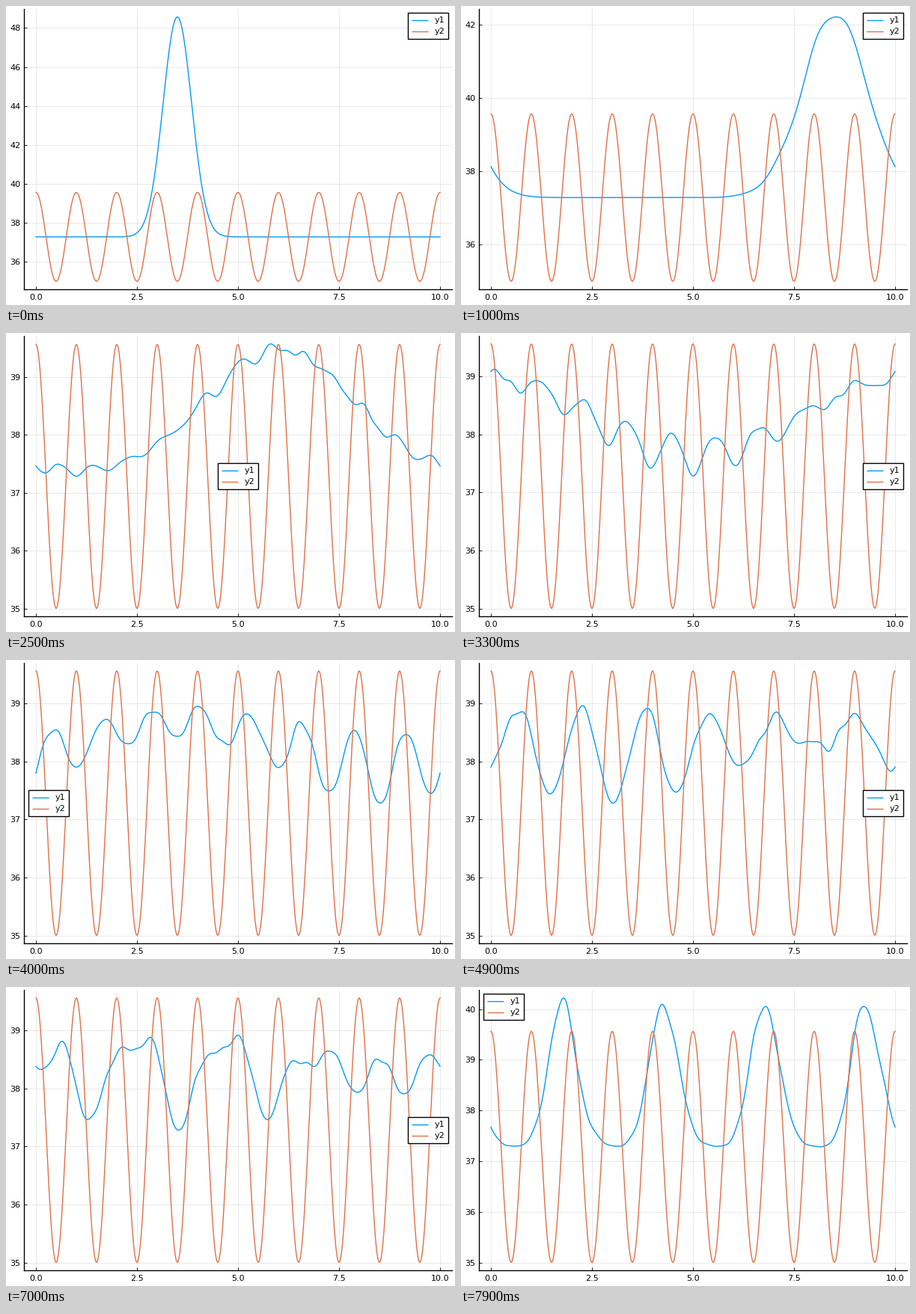
A matplotlib script that plays this animation: 600x400 px, repeating every 8 s.

```python
import numpy as np
import matplotlib.pyplot as plt
from matplotlib.animation import FuncAnimation
from matplotlib.patches import Rectangle

plt.rcParams["font.family"] = "DejaVu Sans"
plt.rcParams["font.size"] = 8

W, H = 600, 400
LEFT, RIGHT, TOP, BOTTOM = 23.8, 596.2, 4, 379
FRAMES, INTERVAL = 80, 100
BLUE, ORANGE = "#009afa", "#e26f46"

# Wave packet on a ring with a cosine lattice
L, N = 10, 500
K0, X0 = 9.74, 3.5
DT, SUB = 0.052, 8
CELL = 0.0262  # spacing of the finite-difference Laplacian
DEPTH = 1.65
BASE, SWING = 37.283, 2.281

x = np.arange(N) * L / N
xs = np.append(x, L)
wave = np.cos(2 * np.pi * xs)
lattice = BASE + SWING * wave


def evolve():
    """Split-step Fourier solution, one density row per frame."""
    h = DT / SUB
    k = 2 * np.pi * np.fft.fftfreq(N, L / N)
    kinetic = (1 - np.cos(k * CELL)) / CELL**2
    half = np.exp(-0.5j * h * DEPTH * wave[:-1])
    drift = np.exp(-1j * h * kinetic)
    psi = np.exp(-2 * (x - X0) ** 2 + 1j * K0 * x)
    psi /= np.sqrt(np.mean(abs(psi) ** 2))
    rows = []
    for _ in range(FRAMES):
        rho = abs(psi) ** 2
        rows.append(BASE + np.append(rho, rho[0]))
        for _ in range(SUB):
            psi = half * np.fft.ifft(drift * np.fft.fft(half * psi))
    return rows


density = evolve()

fig = plt.figure(figsize=(W / 100, H / 100), dpi=100, facecolor="white")
ax = fig.add_axes([LEFT / W, 1 - BOTTOM / H, (RIGHT - LEFT) / W, (BOTTOM - TOP) / H])
ax.set_xlim(-0.3, 10.3)
ax.set_xticks([0, 2.5, 5, 7.5, 10], ["0.0", "2.5", "5.0", "7.5", "10.0"])
ax.spines[["top", "right"]].set_visible(False)
ax.spines[["left", "bottom"]].set_linewidth(1)
ax.tick_params(direction="in", length=3, width=0.6)
ax.tick_params(axis="x", pad=4.5)
ax.tick_params(axis="y", pad=3.2)
ax.set_axisbelow(True)
ax.grid(color="black", alpha=0.1, linewidth=0.6)
(line1,) = ax.plot(xs, density[0], color=BLUE, lw=1)
(line2,) = ax.plot(xs, lattice, color=ORANGE, lw=1)

# Legend, laid out in pixels
BOX_W, BOX_H = 54, 35
SPOTS = [(537, 9), (30, 9), (537, 174), (30, 174), (283, 174)]
over = fig.add_axes([0, 0, 1, 1])
over.set(xlim=(0, W), ylim=(H, 0))
over.axis("off")
box = over.add_patch(Rectangle((0, 0), BOX_W, BOX_H, fc="white", ec="black", lw=1))
keys = []
for name, color, row in (("y1", BLUE, 9.5), ("y2", ORANGE, 24.5)):
    (dash,) = over.plot([], [], color=color, lw=1, solid_capstyle="butt")
    keys.append((dash, over.text(0, 0, name), row))


def best_spot(curves, lo, hi):
    """First spot that covers the fewest curve points."""
    px = LEFT + (xs + 0.3) / 10.6 * (RIGHT - LEFT)

    def hits(spot):
        u, v = spot
        total = 0
        for y in curves:
            py = BOTTOM - (y - lo) / (hi - lo) * (BOTTOM - TOP)
            inside = (px > u) & (px < u + BOX_W) & (py > v) & (py < v + BOX_H)
            total += inside.sum()
        return total

    return min(SPOTS, key=hits)


def draw(i):
    y = density[i]
    lo, hi = min(y.min(), lattice.min()), max(y.max(), lattice.max())
    pad = 0.03 * (hi - lo)
    step = 1 if hi - lo < 6.3 else 2
    lo, hi = lo - pad, hi + pad
    line1.set_ydata(y)
    ax.set_ylim(lo, hi)
    ax.set_yticks(np.arange(np.ceil(lo / step) * step, hi, step))
    u, v = best_spot((y, lattice), lo, hi)
    box.set_xy((u, v))
    for dash, label, row in keys:
        dash.set_data([u + 4.5, u + 27], [v + row, v + row])
        label.set_position((u + 36, v + row + 3.7))
    return line1, line2


anim = FuncAnimation(fig, draw, frames=FRAMES, interval=INTERVAL, repeat=True, repeat_delay=0)
plt.show()
```
